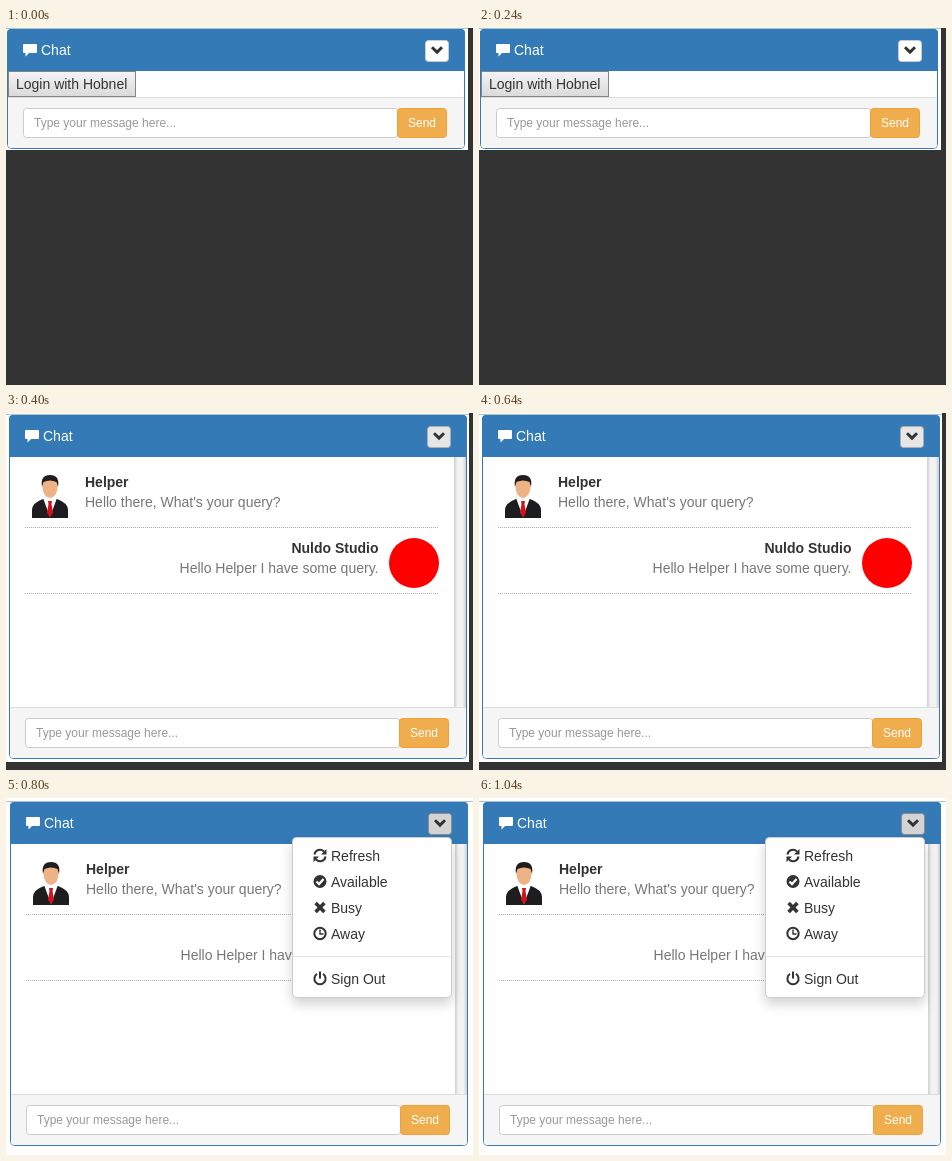
Animation of 467x357 px, one loop 1200 ms. Source, as an HTML page:

```html
<!DOCTYPE html>
<html lang="en">
<head>
<meta charset="utf-8">
<title>Chat widget</title>
<style>
  html, body { margin: 0; width: 100%; height: 100%; overflow: hidden; background: #333; }
  svg { display: block; width: 467px; height: 357px; }
  text { font: 14px "Liberation Sans", Arial, sans-serif; fill: #333; white-space: pre; }
  .bold { font-weight: bold; }
  .soft { fill: #777; }
  .small { font-size: 12px; }
  .light { fill: #fff; }
  .end { text-anchor: end; }
  .menu { filter: drop-shadow(0 6px 6px rgba(0, 0, 0, .175)); }
  .line { fill: none; stroke: #333; stroke-width: 2; }
</style>
</head>
<body>
<svg viewBox="0 0 467 357">
  <defs>
    <linearGradient id="track">
      <stop offset="0" stop-color="#cfcfcf"/><stop offset=".3" stop-color="#f3f3f3"/>
      <stop offset=".7" stop-color="#f3f3f3"/><stop offset="1" stop-color="#cfcfcf"/>
    </linearGradient>
    <linearGradient id="button" x2="0" y2="1">
      <stop offset="0" stop-color="#f4f4f4"/><stop offset="1" stop-color="#dadada"/>
    </linearGradient>
  </defs>
</svg>
<script>
const STEP = 400;
const BLUE = '#337ab7';
const HEAD = 42;
const WIDTH = 458;

const box = (x, y, w, h, fill, stroke, r = 0) => stroke
  ? `<rect x="${x + .5}" y="${y + .5}" width="${w - 1}" height="${h - 1}" rx="${r}" fill="${fill}" stroke="${stroke}"/>`
  : `<rect x="${x}" y="${y}" width="${w}" height="${h}" rx="${r}" fill="${fill}"/>`;
const label = (x, y, words, style = '') => `<text x="${x}" y="${y}" class="${style}">${words}</text>`;
const path = (d, fill) => `<path d="${d}" fill="${fill}"/>`;
const at = (x, y, content, style = '') => `<g transform="translate(${x} ${y})" class="${style}">${content}</g>`;
const dots = y => `<path d="M16 ${y + .5}H430" stroke="#b3a9a9" stroke-dasharray="1 1"/>`;

// Menu icons, each centred on 0,0
const icons = {
  refresh: '<path class="line" d="M-5.5 -1A5.5 5.5 0 0 1 4 -4M5.5 1A5.5 5.5 0 0 1 -4 4"/>' +
    path('M6.5 -6.5V-1H1zM-6.5 6.5V1H-1z', '#333'),
  check: '<circle r="6.5" fill="#333"/><path d="M-3.5 0L-1 2.6L3.6 -2.4" fill="none" stroke="#fff" stroke-width="2.2"/>',
  cross: '<path class="line" style="stroke-width:3.6" d="M-4.4 -4.4L4.4 4.4M4.4 -4.4L-4.4 4.4"/>',
  clock: '<circle class="line" r="5.7"/><path class="line" style="stroke-width:1.4" d="M0 -4V.5H3.5"/>',
  power: '<path class="line" d="M-3 -4.6A5.6 5.6 0 1 0 3 -4.6M0 -7V0"/>'
};

const avatar =
  path('M7 50V42Q7 35 18 31H32Q43 35 43 42V50Z', '#1d1d20') +
  path('M18 30L25 49L32 30Z', '#fff') +
  path('M23 33H27L26.5 36L28 45L25 49L22 45L23.5 36Z', '#d3121c') +
  '<ellipse cx="25" cy="19" rx="7.5" ry="11" fill="#eeb287"/>' +
  path('M17 19Q15 7 25 7Q35 7 33 19L31.5 14Q25 11 18.5 14Z', '#221d1c');

const header = (fill, edge) =>
  path(`M0 ${HEAD}V4Q0 0 4 0H${WIDTH - 4}Q${WIDTH} 0 ${WIDTH} 4V${HEAD}Z`, BLUE) +
  path('M17 15H29Q30 15 30 16V23Q30 24 29 24H22L18.5 27.5V24H17Q16 24 16 23V16Q16 15 17 15Z', '#fff') +
  label(34, 26, 'Chat', 'light') +
  box(418, 11, 24, 22, fill, edge, 3) +
  path('M424 19.2L426 17.2L430 21L434 17.2L436 19.2L430 25.2Z', '#333');

const footer = y =>
  box(1, y, WIDTH - 2, 51, '#f5f5f5', null, 3) +
  box(1, y, WIDTH - 2, 1, '#ddd') +
  box(16, y + 11, 375, 30, '#fff', '#ccc', 3) +
  label(27, y + 30, 'Type your message here...', 'small" style="fill:#999') +
  box(390, y + 11, 50, 30, '#f0ad4e', '#eea236', 3) +
  label(401, y + 30, 'Send', 'small light');

const login =
  box(1, HEAD, 128, 26, 'url(#button)', '#858585') +
  label(9, 60, 'Login with Hobnel');

const talk =
  at(16, 53, avatar) +
  label(76, 72, 'Helper', 'bold') +
  label(76, 92, "Hello there, What's your query?", 'soft') +
  dots(112) +
  label(369.5, 138, 'Nuldo Studio', 'bold end') +
  label(369.5, 158, 'Hello Helper I have some query.', 'soft end') +
  '<circle cx="405" cy="148" r="25" fill="#f00"/>' +
  dots(178) +
  box(445, HEAD, 12, 250, 'url(#track)');

const entries = [
  ['refresh', 'Refresh', 54], ['check', 'Available', 80], ['cross', 'Busy', 106],
  ['clock', 'Away', 132], ['power', 'Sign Out', 177]
];
const menu =
  at(0, 0, box(282, 35, 160, 161, '#fff', '#ccc', 4), 'menu') +
  box(283, 154, 158, 1, '#e5e5e5') +
  entries.map(([icon, words, y]) => at(310, y - .5, icons[icon]) + label(321, y + 5, words)).join('');

const scenes = [
  { x: 1, y: 1, page: [462, 122], body: 26, content: login, button: ['#fff', '#ccc'] },
  { x: 3, y: 2, page: [463, 349], body: 250, content: talk, button: ['#e6e6e6', '#adadad'] },
  { x: 4, y: 4, page: [467, 357], body: 250, content: talk + menu, button: ['#d4d4d4', '#8c8c8c'] }
];

function drawScene({ x, y, page, body, content, button }) {
  const foot = HEAD + body;
  const [base, over] = content.includes(menu) ? [talk, menu] : [content, ''];
  return box(0, 0, ...page, '#fff') +
    box(0, y - 1, page[0], 1, '#a9c4cc') +
    at(x, y,
      box(0, 0, WIDTH, foot + 52, '#fff', BLUE, 4) +
      header(...button) + base + footer(foot) + over);
}

const stage = document.querySelector('svg');
scenes.forEach((scene, i) => {
  const group = document.createElementNS(stage.namespaceURI, 'g');
  group.innerHTML = drawScene(scene);
  stage.append(group);
  const steps = [...scenes.keys(), scenes.length - 1].map((k, n) => ({
    opacity: k === i ? 1 : 0, offset: n / scenes.length, easing: 'step-end'
  }));
  group.animate(steps, { duration: STEP * scenes.length, iterations: Infinity });
});
</script>
</body>
</html>
```
